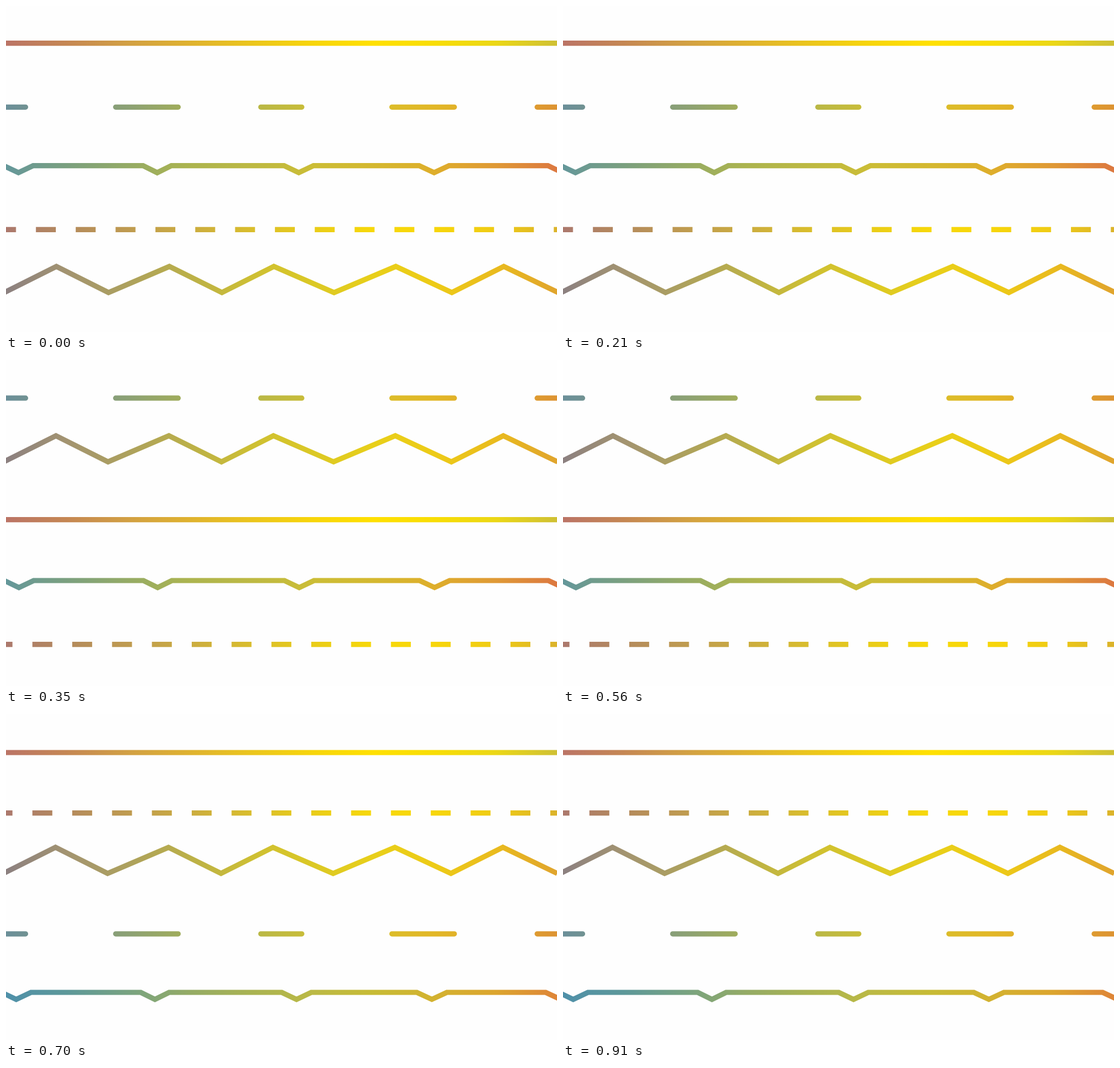
Write an HTML page with a canvas that moves like this. It is 973 px wide and 575 px high and loops after 1.05 s.

```html
<!DOCTYPE html>
<html lang="en">
<head>
<meta charset="utf-8">
<title>Shuffling gradient lines</title>
<style>
  html, body { margin: 0; width: 100%; height: 100%; overflow: hidden; background: #fefefe; }
  canvas { display: block; }
</style>
</head>
<body>
<canvas id="stage" width="973" height="575"></canvas>
<script>
const WIDTH = 973, HEIGHT = 575, HOLD = 350;
const ctx = document.getElementById('stage').getContext('2d');

// Stops are evenly spaced across the stage.
function gradient(colors) {
  const fill = ctx.createLinearGradient(0, 0, WIDTH, 0);
  const stops = colors.split(' ');
  stops.forEach((color, i) => fill.addColorStop(i / (stops.length - 1), color));
  return fill;
}

const paint = {
  solid: gradient('#bb7466 #c58753 #d2a043 #dfb22f #ebc51d #f7d50b #ffe000 #f8dd05 #ebd716 #cfc034'),
  pills: gradient('#6b8f99 #7b9785 #8ca174 #a3ae57 #b7b748 #cabd37 #dabe2a #e2b727 #e0a82c #dd9332'),
  notches: gradient('#64979a #7ba07f #95ab65 #acb44f #bdb943 #cbbd36 #d4b830 #deae2b #df9936 #dc7840'),
  coolNotches: gradient('#4f90a9 #5d9899 #78a381 #94ab65 #a9b352 #bbb945 #c7bb35 #d3b230 #dca52e #de8538'),
  dashes: gradient('#ac796d #b48a5d #bf9b50 #cbac40 #d9bd2d #e9cc19 #f7d80a #f7d60b #efcb15 #dbb32b'),
  zigzag: gradient('#8c8080 #a39470 #ada15d #bbb048 #cdbf34 #dbc825 #e8cf1a #edcb17 #e9bb1e #e0a42d')
};

function polyline(points, dx, y) {
  ctx.beginPath();
  points.forEach(([px, py]) => ctx.lineTo(px + dx, py + y));
  ctx.stroke();
}

function horizontal(from, to, y) {
  ctx.beginPath();
  ctx.moveTo(from, y);
  ctx.lineTo(to, y);
  ctx.stroke();
}

const zigzagPoints = [-3, 89, 181, 288.5, 381.3, 473, 579.3, 688.3, 787.3, 879, 975]
  .map((x, i) => [x, i % 2 ? 0 : 46]);

const notchPoints = [[22, 26], [267, 25], [517, 26], [756, 26.5], [983, 26]]
  .flatMap(([x, half]) => [[x - half, 0], [x, 12.3], [x + half, 0]]);

const draw = {
  solid(y) { horizontal(-10, WIDTH + 10, y); },

  pills(y) {
    ctx.lineCap = 'round';
    for (const [from, to] of [[-20, 34.5], [193.7, 304], [450, 522.3], [681.5, 791.7], [938, 990]])
      horizontal(from, to, y);
    ctx.lineCap = 'butt';
  },

  notches(y, dx) { polyline(notchPoints, dx, y); },
  coolNotches(y, dx) { polyline(notchPoints, dx, y); },

  dashes(y, start) {
    const period = 70.35;
    for (let x = start - period; x < WIDTH; x += period) horizontal(x, x + period / 2, y);
  },

  zigzag(y, dx) { polyline(zigzagPoints, dx, y); }
};

// Each arrangement lists: line, vertical position, horizontal offset.
const arrangements = [
  [['solid', 65.6], ['pills', 178.3], ['notches', 281.7, 0], ['dashes', 394.4, 52.8], ['zigzag', 459.4, 0]],
  [['pills', 67.2], ['zigzag', 133.6, -0.8], ['solid', 281.7], ['notches', 389, 0.8], ['dashes', 501.7, 46.6]],
  [['solid', 68], ['dashes', 174.7, 46.6], ['zigzag', 235.2, -1.6], ['pills', 387.8], ['coolNotches', 491, -4]]
];

function render() {
  const step = Math.floor(performance.now() / HOLD) % arrangements.length;
  ctx.fillStyle = '#fefefe';
  ctx.fillRect(0, 0, WIDTH, HEIGHT);
  ctx.lineWidth = 9.2;
  for (const [line, y, offset] of arrangements[step]) {
    ctx.strokeStyle = paint[line];
    draw[line](y, offset);
  }
  requestAnimationFrame(render);
}
render();
</script>
</body>
</html>
```
